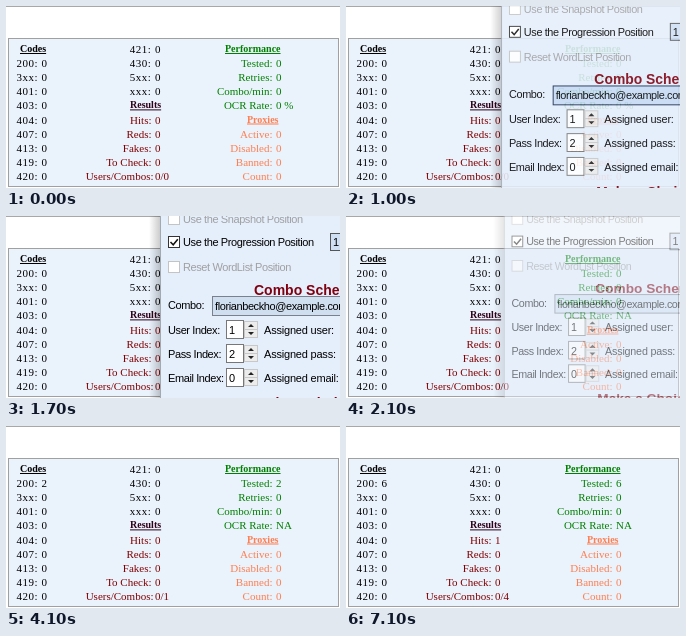
These frames come from a looping animation (334x182 px, 8 s). An HTML page:

```html
<!DOCTYPE html>
<html lang="en">
<head>
<meta charset="utf-8">
<title>Status panel</title>
<style>
  html, body { margin: 0; width: 100%; height: 100%; overflow: hidden; background: #fff; }
  svg { display: block; width: 334px; height: 182px; }
  text { white-space: pre; }
  .serif { font: 11px "Liberation Serif", "Times New Roman", serif; }
  .code { letter-spacing: .5px; }
  .head { font: bold 10px "Liberation Serif", "Times New Roman", serif; text-decoration: underline; }
  .sans { font: 11px "Liberation Sans", Arial, sans-serif; letter-spacing: -.2px; }
  .tight { letter-spacing: -.4px; }
  .title { font: bold 14px "Liberation Sans", Arial, sans-serif; }
</style>
</head>
<body>
<svg id="stage" viewBox="0 0 334 182">
  <defs>
    <linearGradient id="shade">
      <stop offset="0" stop-color="#000" stop-opacity="0"/>
      <stop offset="1" stop-color="#000" stop-opacity=".2"/>
    </linearGradient>
  </defs>
</svg>
<script>
const LOOP = 8000;
const BLACK = '#000', MAROON = '#800000', GREEN = '#008000', CORAL = '#ff7f50';
const GREY = '#a0a0a0', PALE = '#e5eefb', TITLE = '#800010';
const stage = document.getElementById('stage');

function add(parent, tag, attrs, content) {
  const el = document.createElementNS('http://www.w3.org/2000/svg', tag);
  for (const key in attrs) el.setAttribute(key, attrs[key]);
  if (content !== undefined) el.textContent = content;
  parent.append(el);
  return el;
}
const box = (parent, x, y, width, height, fill, stroke = 'none') =>
  add(parent, 'rect', { x, y, width, height, fill, stroke });
const label = (parent, x, y, content, cls, fill = BLACK, anchor = 'start') =>
  add(parent, 'text', { x, y, class: cls, fill, 'text-anchor': anchor }, content);

// Statistics panel
const row = n => 47 + 14.1 * n;
const values = {};
box(stage, 0, 0, 334, 1, '#a8a8a8');
box(stage, 2.5, 32.5, 330, 148, '#eaf2fc', GREY);

function heading(x, n, content, fill) {
  label(stage, x, row(n) - 1, content, 'head', fill);
}
// Names end at `right`, values start at `left`.
function stats(names, right, left, first, fill, cls = 'serif') {
  names.forEach((name, i) => {
    label(stage, right, row(first + i), name + ':', cls, fill, 'end');
    values[name] = label(stage, left, row(first + i), '0', 'serif', fill);
  });
}

heading(14, 0, 'Codes', BLACK);
stats(['200', '3xx', '401', '403', '404', '407', '413', '419', '420'], 32, 35.5, 1, BLACK, 'serif code');
stats(['421', '430', '5xx', 'xxx'], 145.3, 149, 0, BLACK, 'serif code');
heading(124, 4, 'Results', '#300018');
stats(['Hits', 'Reds', 'Fakes', 'To Check'], 145.5, 149, 5, MAROON);
stats(['Users/Combos'], 147.5, 149, 9, MAROON);
heading(219, 0, 'Performance', GREEN);
stats(['Tested', 'Retries', 'Combo/min', 'OCR Rate'], 266.5, 270, 1, GREEN);
heading(241, 5, 'Proxies', CORAL);
stats(['Active', 'Disabled', 'Banned', 'Count'], 266.5, 270, 6, CORAL);

const pointer = add(stage, 'path', { d: 'M286 180h1v1h2v1h-3z', fill: '#444' });

// Settings window
const win = add(stage, 'g', {});
box(win, 143, -20, 11, 230, 'url(#shade)');
box(win, 154.5, -20.5, 230, 230, PALE, '#a4a8b0');

function checkbox(y, content, enabled) {
  box(win, 162.5, y - 5.5, 11, 11, '#fff', enabled ? '#333' : '#c4c4c4');
  if (enabled) {
    add(win, 'path', { d: `M164.5 ${y}l2.7 2.8 4.6-5.6`, fill: 'none', stroke: '#111', 'stroke-width': 1.5 });
  }
  label(win, 177, y + 4, content, 'sans tight', enabled ? BLACK : GREY);
}
checkbox(3, 'Use the Snapshot Position', false);
checkbox(26, 'Use the Progression Position', true);
checkbox(51, 'Reset WordList Position', false);
box(win, 324.5, 17.5, 40, 17, '#cfe0f5', '#555');
label(win, 327, 30, '1', 'sans');

label(win, 248, 79, 'Combo Scheme', 'title', TITLE);
label(win, 162, 93, 'Combo:', 'sans tight');
const field = box(win, 206.5, 80.5, 170, 19, PALE, GREY);
label(win, 209, 94, 'florianbeckho@example.com', 'sans tight');

[['User', 1], ['Pass', 2], ['Email', 0]].forEach(([name, index], i) => {
  const y = 114 + 24 * i;
  label(win, 162, y + 4, name + ' Index:', 'sans tight');
  box(win, 220.5, y - 9.5, 17, 18, '#fff', '#777');
  box(win, 238.5, y - 8.5, 13, 8, '#ececec', '#c8c8c8');
  box(win, 238.5, y - .5, 13, 8, '#ececec', '#c8c8c8');
  add(win, 'path', { d: `M242 ${y - 3}l3-3 3 3zM242 ${y + 2}l3 3 3-3z`, fill: '#222' });
  label(win, 223, y + 4, index, 'sans');
  label(win, 258, y + 4, `Assigned ${name.toLowerCase()}:`, 'sans');
});
label(win, 250, 192, 'Make a Choice', 'title', TITLE);

// Step tables: [start time, ...state]
const windowSteps = [
  [0, 0, 1], [900, .67, .98], [1000, .88, .993], [1100, .99, 1], [1200, 1, 1],
  [2100, .5, .975], [2200, .16, .955], [2300, 0, 1]
];
const fieldSteps = [
  [0, '#c6dbf4', '#1c2c50'], [1400, '#c8dcf3', '#33415f'], [1500, '#cbddf2', '#4a566e'],
  [1600, '#cddef1', '#626b7d'], [1700, '#d0dff0', '#7a808c']
];
const countSteps = [
  [0, 0, 0, 0, '0 %'], [1300, 0, 0, 0, 'NA'], [4100, 2, 0, 1, 'NA'],
  [5100, 4, 0, 2, 'NA'], [6100, 5, 1, 3, 'NA'], [7100, 6, 1, 4, 'NA']
];
const stepAt = (steps, t) => steps.findLast(step => step[0] <= t).slice(1);

function render(t) {
  const [opacity, scale] = stepAt(windowSteps, t);
  win.setAttribute('opacity', opacity);
  win.setAttribute('transform', `translate(303 4) scale(${scale}) translate(-303 -4)`);

  const [fill, stroke] = stepAt(fieldSteps, t);
  field.setAttribute('fill', fill);
  field.setAttribute('stroke', stroke);

  const [tested, hits, combos, rate] = stepAt(countSteps, t);
  values['200'].textContent = values['Tested'].textContent = tested;
  values['Hits'].textContent = hits;
  values['Users/Combos'].textContent = '0/' + combos;
  values['OCR Rate'].textContent = rate;
  pointer.setAttribute('visibility', t >= 2500 && t < 2700 ? 'visible' : 'hidden');
}

const start = performance.now();
function tick() {
  render((performance.now() - start) % LOOP);
  requestAnimationFrame(tick);
}
tick();
</script>
</body>
</html>
```
